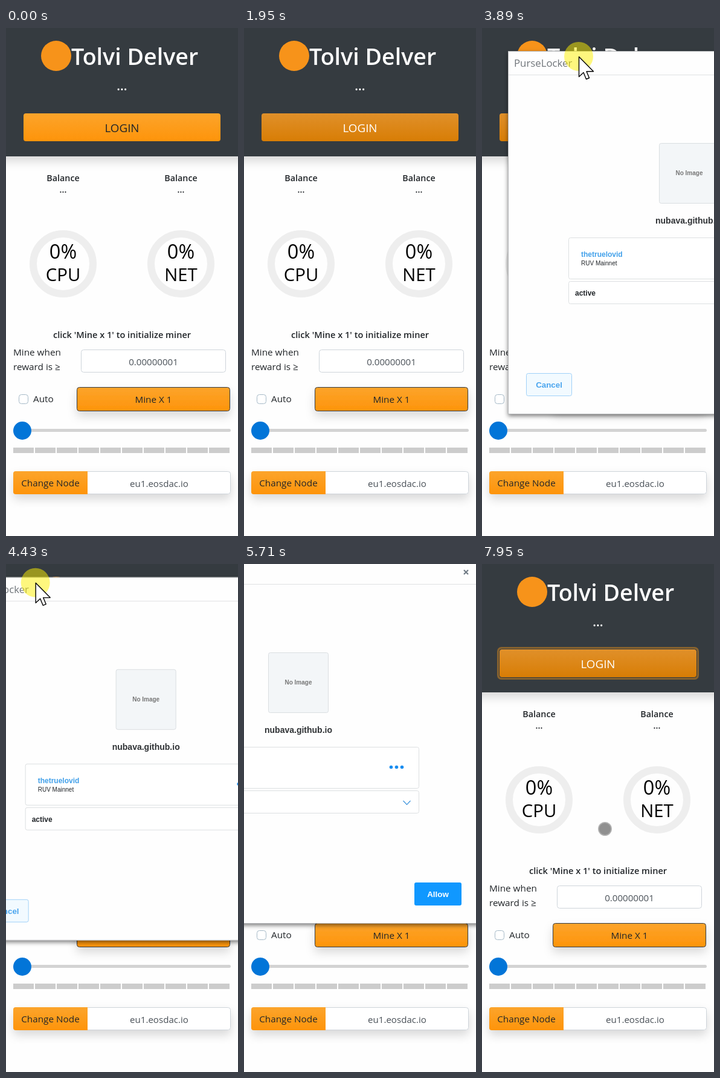
These frames come from a looping animation (384x839 px, 8 s). An HTML page:

```html
<!DOCTYPE html>
<html lang="en">
<head>
<meta charset="utf-8">
<title>Miner login</title>
<style>
html, body { margin: 0; width: 100%; height: 100%; overflow: hidden; background: #fefefe; }
svg { display: block; width: 100vw; height: 100vh; }
text { font: 15.3px "Open Sans", "Noto Sans", sans-serif; fill: #212529; }
.mid { text-anchor: middle; }
.semi { font-weight: 600; }
.big { fill: #000; }
.field { fill: #fff; stroke: #ced4da; }
.value { fill: #495057; font-size: 15.1px; }
#win text { font-family: "Liberation Sans", Arial, sans-serif; font-weight: bold; }
#win .title { font: 16.8px "Open Sans", "Noto Sans", sans-serif; fill: #70757a; }
.card { fill: #fff; stroke: #dcdfe1; }
.pointer { fill: #fff; stroke: #000; stroke-width: 1.4; stroke-linejoin: round; }
</style>
</head>
<body>
<svg viewBox="0 0 384 839" preserveAspectRatio="none">
  <defs>
    <linearGradient id="bright" x2="0" y2="1">
      <stop stop-color="#fca42b"/><stop offset="1" stop-color="#fe940a"/>
    </linearGradient>
    <linearGradient id="dim" x2="0" y2="1">
      <stop stop-color="#e0902a"/><stop offset="1" stop-color="#d87d05"/>
    </linearGradient>
    <filter id="soft" x="-20%" y="-30%" width="140%" height="190%">
      <feDropShadow dx="0" dy="8" stdDeviation="8" flood-opacity=".15"/>
    </filter>
    <filter id="deep" x="-5%" y="-5%" width="110%" height="110%">
      <feDropShadow dx="0" dy="3" stdDeviation="3.5" flood-opacity=".5"/>
    </filter>
  </defs>

  <rect width="384" height="839" fill="#fefefe"/>
  <rect x="-40" y="-40" width="464" height="252" fill="#343a40" filter="url(#soft)"/>
  <circle cx="83" cy="46" r="25" fill="#f7931a"/>
  <text x="108" y="61" class="semi" style="font-size:37.6px;fill:#fff">Tolvi Delver</text>
  <text x="192" y="103" class="mid semi" style="font-size:21px;fill:#fff">...</text>

  <rect id="glow" x="25" y="137" width="334" height="54" rx="7" fill="#d98a1c" fill-opacity=".5"/>
  <rect id="login" x="29" y="141" width="326" height="46" rx="4"/>
  <rect id="rim" x="28.5" y="140.5" width="327" height="47" rx="4" fill="none" stroke="#343a40"/>
  <text id="loginText" x="192" y="171.5" class="mid" style="font-size:18.8px">LOGIN</text>

  <g id="gauges"></g>

  <text x="192" y="512" class="mid semi" style="font-size:14.6px">click 'Mine x 1' to initialize miner</text>
  <text x="12" y="541">Mine when</text>
  <text x="12" y="565">reward is ≥</text>
  <rect class="field" x="124.5" y="531.5" width="239" height="37" rx="4"/>
  <text x="244" y="557" class="mid value">0.00000001</text>

  <rect x="21.5" y="605.5" width="15" height="15" rx="4" fill="#fff" stroke="#a5b9c7"/>
  <text x="45" y="618">Auto</text>
  <rect x="117.5" y="593.5" width="253" height="39" rx="4" fill="url(#bright)" stroke="#343a40" filter="url(#soft)"/>
  <text x="244" y="619" class="mid">Mine X 1</text>

  <rect x="12" y="662" width="360" height="5" rx="2.5" fill="#d3d3d3"/>
  <circle cx="27" cy="665" r="15" fill="#0275d8"/>
  <path d="M12 697.5H371" stroke="#ccc" stroke-width="9" stroke-dasharray="34 2"/>

  <rect class="field" x="12.5" y="732.5" width="359" height="37" rx="4" filter="url(#soft)"/>
  <path d="M135 732H16a4 4 0 0 0-4 4v30a4 4 0 0 0 4 4H135Z" fill="url(#bright)"/>
  <text x="73.5" y="757" class="mid">Change Node</text>
  <text x="253.5" y="758" class="mid value">eu1.eosdac.io</text>

  <g id="win">
    <rect width="600" height="600" fill="#fefefe" filter="url(#deep)"/>
    <rect x=".5" y=".5" width="599" height="599" fill="#fefefe" stroke="#b4b6b8"/>
    <path d="M1 39.5H599" stroke="#dfe1e3"/>
    <text class="title" x="10" y="26">PurseLocker</text>
    <path d="M574 16l7 7m0-7l-7 7" stroke="#717c86" stroke-width="2.2"/>
    <rect x="250.5" y="152.5" width="99" height="99" rx="3" fill="#f3f6f8" stroke="#dadee1"/>
    <text x="300" y="205" class="mid" style="font-size:10px;fill:#777">No Image</text>
    <text x="300" y="285" class="mid" style="font-size:14px;fill:#2f3235">nubava.github.io</text>
    <rect class="card" x="100.5" y="308.5" width="399" height="68" rx="3"/>
    <text x="121" y="340" style="font-size:12px;fill:#41a0ea">thetruelovid</text>
    <text x="121" y="354" style="font-size:10px;font-weight:400">RUV Mainnet</text>
    <g fill="#1a8df0">
      <circle cx="453.5" cy="341.5" r="2.8"/><circle cx="462.5" cy="341.5" r="2.8"/><circle cx="471.5" cy="341.5" r="2.8"/>
    </g>
    <rect class="card" x="100.5" y="380.5" width="399" height="37" rx="3"/>
    <text x="111" y="404" style="font-size:12px">active</text>
    <path d="M473.5 397l6 6.3 6-6.3" fill="none" stroke="#3a93dd" stroke-width="1.2"/>
    <rect x="30.5" y="532.5" width="75" height="37" rx="3" fill="#f2faff" stroke="#a0d1f8"/>
    <text x="68" y="556" class="mid" style="font-size:13.33px;fill:#4aa5ee">Cancel</text>
    <rect x="492" y="532" width="78" height="38" rx="3" fill="#1098ff"/>
    <text x="531" y="556" class="mid" style="font-size:13.33px;fill:#fff">Allow</text>
  </g>

  <circle id="halo" r="24" fill="#fff200" fill-opacity=".5"/>
  <path id="arrow" class="pointer" d="M.5 .5V33.5L8 26.5L12.5 37.5L17.5 35.5L13 24.8H24.5Z"/>
  <path id="hand" class="pointer" d="M-3 3Q-3-1 .5-1Q4-1 4 3V13Q5 11.5 7.5 12Q10 12.5 10 15Q11.5 13.5 14 14.2Q16 15 16 17.5Q18 16.5 20 17.8Q21.5 19 21.5 22V31Q21 40 14 45.5H1Q-3 44-5 39L-11 29Q-13 25-10 24Q-7 23.5-3 29ZM4 13V21M10 15V22M16 17.5V23"/>
  <circle id="dot" r="10.5" fill="#808080" fill-opacity=".87" stroke="#aaa" stroke-opacity=".85" stroke-width="2"/>
</svg>
<script>
const LOOP = 8000;
const $ = id => document.getElementById(id);
const [glow, login, rim, loginText, win, halo, arrow, hand, dot] =
  ["glow", "login", "rim", "loginText", "win", "halo", "arrow", "hand", "dot"].map($);

$("gauges").innerHTML = [[94.5, "CPU"], [289.5, "NET"]].map(([x, name]) => `
  <text x="${x}" y="252.5" class="mid semi" style="font-size:14.3px">Balance</text>
  <text x="${x}" y="271.5" class="mid semi" style="font-size:14.3px">...</text>
  <circle cx="${x}" cy="389.5" r="49.5" fill="none" stroke="#eee" stroke-width="12"/>
  <text x="${x}" y="381" class="mid big" style="font-size:32.5px">0%</text>
  <text x="${x}" y="418" class="mid big" style="font-size:29.3px">${name}</text>`).join("");

// Keys: time, x, y
const winPath = [
  [3280, 330, 143], [3460, 110, 50], [3660, 110, 50], [3730, 50, 43],
  [3885, 50, 43], [3890, 43, 38], [3915, 43, 38], [3920, 27, 36],
  [4130, 27, 36], [4920, -268, -8], [5045, -268, -8], [5050, -271, -10],
  [5075, -271, -10], [5400, 0, 25], [5710, -210, -6], [5755, -210, -6], [5820, -264, -13]
];
const tapPath = [
  [150, 350, 822], [350, 324.5, 620.5], [610, 324.5, 620.5],
  [1360, 134.5, 143.5], [1490, 134.5, 143.5], [1930, 368.5, 150]
];
const leavePath = [[7720, 274.5, 535.5], [7890, 190.5, 446], [7945, 203.5, 437.5]];
const mousePath = [[6150, -12, 190], [6730, 281, 552], [6970, 281, 552], [7060, 273, 536]];

const clamp = v => Math.max(0, Math.min(1, v));
const ease = v => v * v * (3 - 2 * v);
const ramp = (t, from, to) => clamp((t - from) / (to - from));
const during = (t, from, to) => t >= from && t < to;

function along(path, t) {
  const n = path.findIndex(k => k[0] > t);
  if (n < 0) return path[path.length - 1].slice(1);
  if (n === 0) return path[0].slice(1);
  const [t0, x0, y0] = path[n - 1], [t1, x1, y1] = path[n];
  const k = ease((t - t0) / (t1 - t0));
  return [x0 + (x1 - x0) * k, y0 + (y1 - y0) * k];
}

function show(el, on) { el.style.display = on ? "" : "none"; }
function move(el, [x, y]) { el.setAttribute("transform", `translate(${x} ${y})`); }

function draw(t) {
  const pressed = t >= 1490;
  login.setAttribute("fill", pressed ? "url(#dim)" : "url(#bright)");
  loginText.style.fill = pressed ? "#fff" : "#212529";
  const focus = t < 3000
    ? ramp(t, 1490, 1640) * (1 - ramp(t, 1800, 1940))
    : ramp(t, 7370, 7520);
  glow.setAttribute("opacity", focus);
  rim.setAttribute("opacity", focus);

  const [wx, wy] = along(winPath, t);
  const gone = ramp(t, 7240, 7390);
  const scale = 1 - 0.1 * ease(gone);
  show(win, during(t, 3280, 7390));
  win.setAttribute("opacity", 1 - gone);
  win.setAttribute("transform",
    `translate(${wx + 300 * (1 - scale)} ${wy + 300 * (1 - scale)}) scale(${scale})`);

  const dragging = during(t, 3280, 5820);
  const aiming = during(t, 6150, 7240);
  const mouse = dragging ? [wx + 117, wy + 9] : along(mousePath, t);
  const overAllow = aiming && mouse[0] > 228 && mouse[1] > 519;
  show(halo, dragging);
  show(arrow, dragging || (aiming && !overAllow));
  show(hand, overAllow);
  for (const el of [halo, arrow, hand]) move(el, mouse);

  show(dot, during(t, 150, 1940) || t >= 7720);
  move(dot, along(t < 4000 ? tapPath : leavePath, t));
}

let start;
function tick(now) {
  start ??= now;
  draw((now - start) % LOOP);
  requestAnimationFrame(tick);
}
draw(0);
requestAnimationFrame(tick);
</script>
</body>
</html>
```
